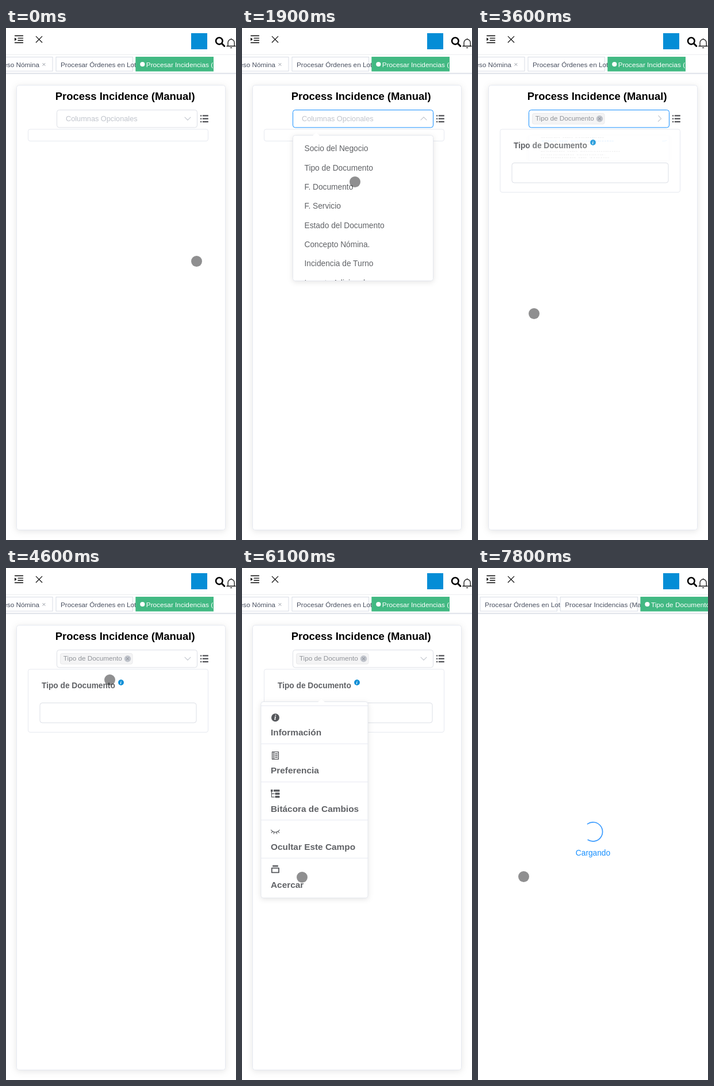
Write an HTML page that moves like this. It is 400 by 890 pixels and loops after 8 s.

```html
<!DOCTYPE html>
<html lang="es">
<head>
<meta charset="utf-8">
<title>Process Incidence</title>
<style>
html, body { margin: 0; width: 100%; height: 100%; overflow: hidden; background: #fff; }
svg { display: block; width: 100%; height: 100%; }
text { font: 13.75px "Liberation Sans", Arial, sans-serif; fill: #606266; white-space: pre; }
.tab { font-size: 11.76px; fill: #495060; }
.bold { font-weight: bold; }
.line { fill: none; stroke-linecap: round; stroke-linejoin: round; }
.pop { fill: #fff; stroke: #e4e7ed; filter: drop-shadow(0 2px 5px rgba(0, 0, 0, .1)); }
</style>
</head>
<body>
<svg id="stage" viewBox="0 0 400 890" xmlns="http://www.w3.org/2000/svg"></svg>
<script>
const LOOP = 8000, STEP = 100;
const BLUE = '#1890ff', GREY = '#dcdfe6';
const HOLDS = [7300, 7700, 7900];

// Pointer path: time, x, y
const PATH = [
  [100, 331.5, 405.5], [200, 318, 350], [300, 275, 205], [400, 243.5, 109.5],
  [500, 243.5, 109.5], [600, 248.5, 130], [700, 242, 156], [800, 235, 167.5], [900, 231.5, 162],
  [1400, 231.5, 162], [1900, 196.5, 267.5], [2000, 165, 244], [2100, 111.5, 215], [2200, 140, 158.5],
  [2900, 140, 158.5], [3000, 190, 210], [3100, 227.5, 330], [3200, 130, 450], [3300, 97.5, 496.5],
  [3900, 97.5, 496.5], [4100, 120, 400], [4400, 165.5, 200.5], [4600, 180.5, 194.5], [4800, 191.5, 197.5],
  [5500, 191.5, 197.5], [5700, 172, 330], [6000, 115, 545.5], [6100, 104.5, 537.5],
  [6400, 81.5, 536.5], [6500, 79.5, 536.5]
];

const rect = (x, y, w, h, fill, stroke = 'none', r = 0) =>
  `<rect x="${x}" y="${y}" width="${w}" height="${h}" rx="${r}" fill="${fill}" stroke="${stroke}"/>`;
const text = (x, y, s, attrs = '') => `<text x="${x}" y="${y}" ${attrs}>${s}</text>`;
const line = (d, color, w = 1, attrs = '') =>
  `<path class="line" d="${d}" stroke="${color}" stroke-width="${w}" ${attrs}/>`;
const dot = (x, y, r, fill) => `<circle cx="${x}" cy="${y}" r="${r}" fill="${fill}"/>`;

function tab(x, w, label, active) {
  const box = active ? rect(x, 50, w, 25.5, '#42b983') : rect(x, 50.5, w, 24.5, '#fff', '#d8dce5');
  return box + (active ? dot(x + 12, 63, 4.1, '#fff') : '') +
    text(x + (active ? 18.5 : 8), 68, label, `class="tab" ${active ? 'style="fill:#fff"' : ''}`);
}

const info = (x, y, r, fill) => dot(x, y, r, fill) +
  text(x - .2, y + r * .62, 'i', `text-anchor="middle" style="font:italic bold ${r * 1.75}px 'Liberation Serif',serif;fill:#fff"`);

function header() {
  const lines = [13.5, 17.6, 21.5, 25.5].map((y, i) => `M${i % 3 ? 20.5 : 15} ${y}H30`).join('');
  const orders = 'Procesar Órdenes en Lote', incidents = 'Procesar Incidencias (Manual)';
  return rect(0, 0, 400, 78, '#fff') + rect(0, 45.5, 400, 1.5, '#f1f2f4') +
    rect(0, 78, 400, 1, '#d8dce5') + rect(0, 79, 400, 1, '#eceef2') + rect(0, 80, 400, 1, '#f7f8fa') +
    `<path class="line" d="${lines}" stroke="#000" stroke-width="1.4" style="stroke-linecap:butt"/>` +
    '<path d="M15 16.8L18.6 19.6L15 22.4z"/>' +
    line('M52.3 14.6L62.7 25M62.7 14.6L52.3 25', '#111', 1.2) +
    rect(322, 9, 28, 28, '#058dd6') +
    `<circle cx="370.8" cy="22.6" r="5.8" fill="none" stroke="#000" stroke-width="2.6"/>` +
    line('M375.3 27L379.8 31.5', '#000', 3) +
    line('M384 31.5H399M386 31.5V25.5A5.6 5.8 0 0 1 397.2 25.5V31.5M391.6 19.5V18.6M390.5 34.3H392.7', '#111', 1.3) +
    '<g id="tabsA">' + rect(-60, 50.5, 141, 24.5, '#fff', '#d8dce5') +
    text(58, 68, 'Proceso Nómina', 'class="tab" text-anchor="end"') +
    line('M63.8 61.3L68 65.5M68 61.3L63.8 65.5', '#8c919b', .9) +
    tab(87, 133.5, orders) + tab(225.3, 135.7, incidents, true) + '</g>' +
    '<g id="tabsB">' + tab(3.8, 133.7, orders) + tab(143.2, 134.5, incidents) +
    tab(282.4, 140, 'Tipo de Documento', true) + '</g>';
}

function page() {
  const list = [152.5, 157.7, 163].map(y => rect(341.8, y - 1.2, 10, 2.3, '#505156') + dot(339.1, y, 1.2, '#505156')).join('');
  return '<rect x="18.5" y="99.5" width="363" height="773" rx="4" fill="#fff" stroke="#e6e9f1" style="filter:drop-shadow(0 2px 6px rgba(0,0,0,.1))"/>' +
    text(207.2, 125, 'Process Incidence (Manual)', 'class="bold" text-anchor="middle" style="font-size:18.45px;fill:#000"') +
    '<rect id="select" x="88.5" y="142.5" width="244" height="30.5" rx="4" fill="#fff"/>' +
    text(104, 162, 'Columnas Opcionales', 'id="hint" style="font-size:12.74px;fill:#c0c4cc"') +
    '<g id="chip">' + rect(94.5, 148.5, 125.5, 18.5, '#f4f4f5', '#e9e9eb', 3) +
    text(99.8, 161, 'Tipo de Documento', 'style="font-size:11.76px;fill:#909399"') +
    dot(211.5, 157.7, 5.7, '#c0c4cc') + line('M209.4 155.6L213.6 159.8M213.6 155.6L209.4 159.8', '#85888f') + '</g>' +
    line('M-5 2.4L0 -2.6L5 2.4', '#c0c4cc', 1.1, 'id="chevron"') + list +
    '<rect id="panel" x="38.5" y="176" width="313" rx="3.5" fill="none" stroke="#e6e9f0"/>' +
    '<g id="field">' + text(62, 209, 'Tipo de Documento', 'class="bold" style="font-size:13.72px"') +
    info(200, 199, 4.9, '#058dd6') + rect(59, 234.5, 272, 34.5, '#fff', GREY, 4) + '</g>';
}

function dropdown() {
  const names = ['Socio del Negocio', 'Tipo de Documento', 'F. Documento', 'F. Servicio',
    'Estado del Documento', 'Concepto Nómina.', 'Incidencia de Turno', 'Importe Adicional'];
  const rows = names.map((s, i) => text(108.5, 28.3 + i * 33.33, s, i === 1 ? 'id="picked"' : '')).join('');
  return '<clipPath id="cut"><rect x="89" y="0" width="243" height="253"/></clipPath><g id="drop">' +
    '<rect class="pop" x="88.5" y=".5" width="244" height="253" rx="4"/>' +
    '<path d="M123 1.2L129 -4.6L135 1.2z" fill="#fff"/>' +
    `<g clip-path="url(#cut)">${rows}</g>` + line('M320.5 57L323 59.8L328 54', BLUE, 1.3, 'id="check"') + '</g>';
}

function menu() {
  const C = '#56585c';
  const icons = [
    info(58, 260, 7, C),
    line('M52.6 319.6H63.4V332.4H52.6zM55.4 320V332M57.8 323H61.3M57.8 326H61.3M57.8 329H61.3', C, 1.4),
    line('M51.5 386V398.2H56M51.5 392.4H56', C, 1.2) + rect(50, 385.2, 3.6, 3.6, C) + rect(55, 385.2, 10.5, 3.6, C, 'none', .8) +
      rect(57.5, 390.6, 8, 3.6, C, 'none', .8) + rect(57.5, 396, 8, 3.6, C, 'none', .8),
    line('M50.5 455.3Q58 463.3 65.2 455.3M53 458L51.2 460.2M56 459.3L55.2 462M60 459.3L60.7 462M63 458L64.6 460.2', C, 1.1),
    line('M51.8 521.6H64V529.3H51.8z', C, 1.8) + rect(53.2, 516.8, 9.6, 2.5, C)
  ];
  const names = ['Información', 'Preferencia', 'Bitácora de Cambios', 'Ocultar Este Campo', 'Acercar'];
  return '<g id="menu"><rect class="pop" x="33" y="232.5" width="186" height="341" rx="4"/>' +
    '<path d="M132 233.2L138 227.6L144 233.2z" fill="#fff"/>' +
    names.map((s, i) => line(`M33.5 ${239.5 + i * 66.2}H218.5`, '#e6e9f1') + icons[i] +
      text(50, 291.3 + i * 66.1, s, 'class="bold" style="font-size:15.4px"')).join('') + '</g>';
}

const stage = document.getElementById('stage');
stage.innerHTML = `<g id="page">${page()}</g>` + header() + dropdown() + menu() +
  `<g id="loading">${line('', '#3a9bff', 1.7, 'id="spin"')}` +
  text(200, 500, 'Cargando', `text-anchor="middle" style="font-size:13.72px;fill:${BLUE}"`) + '</g>' +
  '<circle id="pointer" r="9.5" fill="rgba(32,32,34,.5)"/>' +
  '<g id="status"><path d="M0 870H127Q130 870 130 873V890H0z" fill="#757575"/>' +
  text(3, 886, 'Waiting for 0.0.0.0...', 'style="font:12.4px \'Noto Sans\',\'Open Sans\',sans-serif;fill:#fff"') + '</g>';

const el = {};
stage.querySelectorAll('[id]').forEach(n => el[n.id] = n);
const set = (n, attrs) => { for (const k in attrs) n.setAttribute(k, attrs[k]); };
const show = (n, on) => set(n, { display: on ? 'inline' : 'none' });
const clamp = v => Math.max(0, Math.min(1, v));
const progress = (t, start, ms) => clamp((t - start) / ms);

function bezier(x1, y1, x2, y2) {
  const at = (a, b, u) => 3 * a * u * (1 - u) ** 2 + 3 * b * u * u * (1 - u) + u ** 3;
  return x => {
    let lo = 0, hi = 1;
    for (let i = 0; i < 24; i++) {
      const mid = (lo + hi) / 2;
      if (at(x1, x2, mid) < x) lo = mid; else hi = mid;
    }
    return at(y1, y2, hi);
  };
}
const ease = bezier(.25, .1, .25, 1);
const easeInOut = bezier(.42, 0, .58, 1);
const zoom = bezier(.23, 1, .32, 1);

function pointerAt(t) {
  const i = PATH.findIndex(p => p[0] > t);
  if (i < 0) return PATH[PATH.length - 1].slice(1);
  if (i === 0) return PATH[0].slice(1);
  const [t0, x0, y0] = PATH[i - 1], [t1, x1, y1] = PATH[i];
  const k = (t - t0) / (t1 - t0);
  return [x0 + (x1 - x0) * k, y0 + (y1 - y0) * k];
}

function arc(t) {
  const s = Math.max(0, t - 7120) / 1000, p = s % 1.5 / .75;
  const grow = easeInOut(Math.min(p, 1)), slide = easeInOut(clamp(p - 1));
  const unit = Math.PI * 2 / 125.66;
  const from = (40 * grow + 80 * slide) * unit + s * Math.PI;
  const span = Math.min(1 + 89 * grow, 125.6 - 40 * grow - 80 * slide) * unit;
  const pt = a => `${200 + 16.6 * Math.cos(a)} ${458.5 + 16.6 * Math.sin(a)}`;
  return `M${pt(from)}A16.6 16.6 0 ${span > Math.PI ? 1 : 0} 1 ${pt(from + span)}`;
}

function draw(t) {
  const picked = t >= 2400;
  const closing = t >= 3515;
  const open = closing ? 1 - zoom(progress(t, 3515, 300)) : zoom(progress(t, 1060, 300));
  const turn = closing ? 180 * ease(progress(t, 3510, 300)) : 180 * (1 - ease(progress(t, 1060, 300)));

  set(el.select, { stroke: t >= 1100 && t < 3700 ? BLUE : GREY });
  set(el.chevron, { transform: `translate(316 157.5) rotate(${turn})` });
  show(el.hint, !picked);
  show(el.chip, picked);
  show(el.field, picked);
  set(el.panel, { height: picked ? 109.5 : 20.5 });

  show(el.drop, open > .005);
  set(el.drop, { transform: `translate(0 186) scale(1 ${open})`, opacity: open });
  el.picked.style.fill = picked ? BLUE : '';
  el.picked.style.fontWeight = picked ? 'bold' : '';
  show(el.check, picked);

  const shown = progress(t, 4930, 250) * (1 - progress(t, 6640, 150));
  show(el.menu, shown > 0);
  set(el.menu, { opacity: shown });

  const leave = ease(progress(t, 6760, 500));
  show(el.page, leave < .985);
  set(el.page, { opacity: 1 - leave, transform: `translate(${30 * leave} 0)` });
  show(el.tabsA, t < 6800);
  show(el.tabsB, t >= 6800);
  show(el.status, t >= 6800 && t < 7200);

  const enter = ease(progress(t, 7255, 500));
  show(el.loading, enter > 0);
  set(el.loading, { opacity: enter, transform: `translate(${30 * enter - 30} 0)` });
  set(el.spin, { d: arc(t) });

  const [x, y] = pointerAt(t);
  set(el.pointer, { cx: x, cy: y });
}

const start = performance.now();
function tick() {
  let t = Math.floor((performance.now() - start) % LOOP / STEP) * STEP;
  if (HOLDS.includes(t)) t -= STEP;
  draw(t);
  requestAnimationFrame(tick);
}
tick();
</script>
</body>
</html>
```
